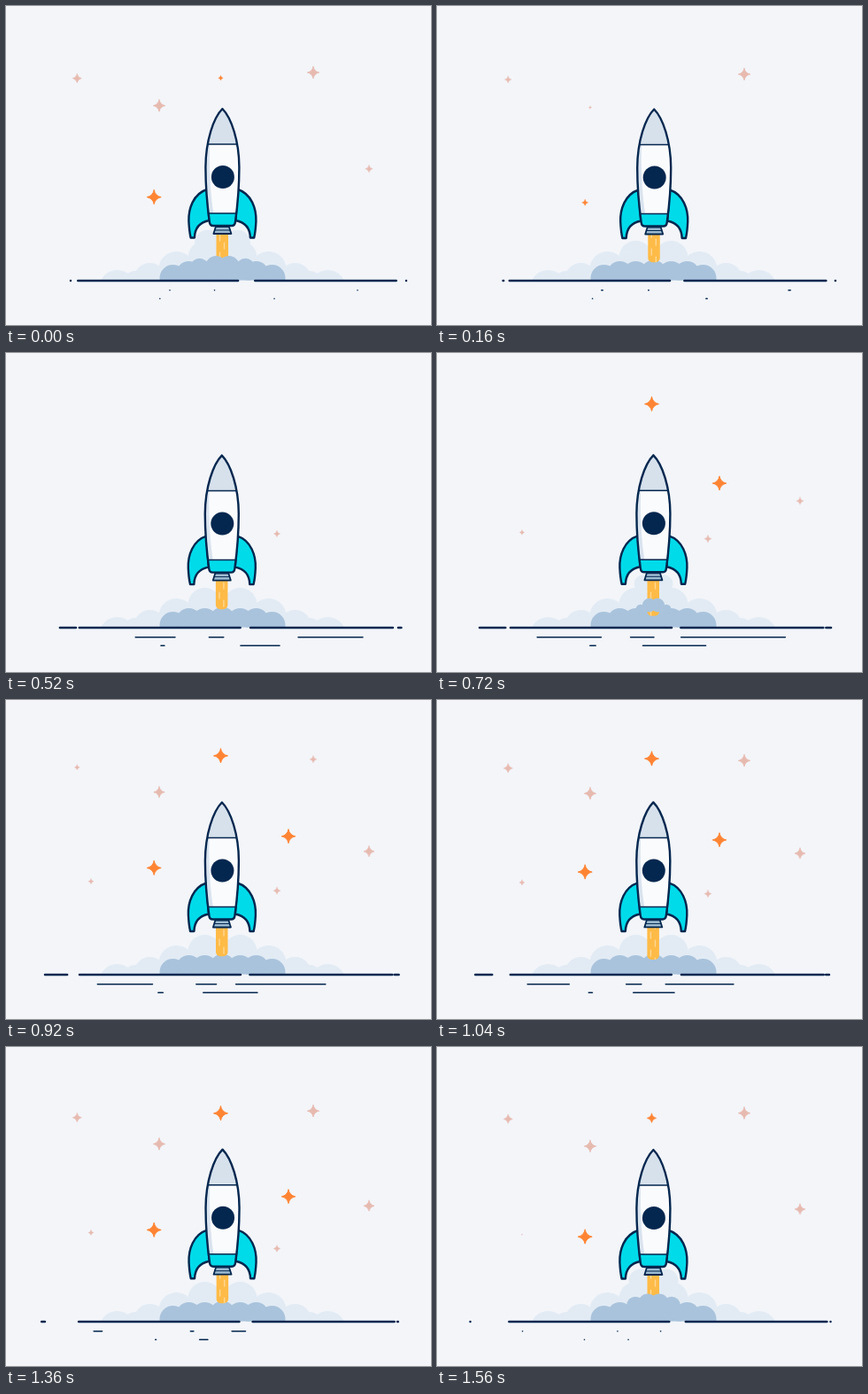
An HTML page with a canvas that plays this animation: 480x360 px, repeating every 1.6 s.

```html
<!DOCTYPE html>
<html lang="en">
<head>
<meta charset="utf-8">
<title>Rocket</title>
<style>
html, body { margin: 0; width: 100%; height: 100%; overflow: hidden; background: #f3f5f9; }
canvas { display: block; width: 480px; height: 360px; }
</style>
</head>
<body>
<canvas id="stage"></canvas>
<script>
const LOOP = 1600, PUFF = 400, MID = 244.5, GROUND = 309.5;
const NAVY = '#04274f', CYAN = '#00dbea', PALE = '#e2ebf4', SMOKE = '#a9c3dc';
const ORANGE = '#ff8433', PINK = '#e7bab0';

const canvas = document.getElementById('stage');
const dpr = window.devicePixelRatio || 1;
canvas.width = 480 * dpr;
canvas.height = 360 * dpr;
const ctx = canvas.getContext('2d');

// x, first y, px per second, radius, birth, life, colour
const stars = [
  [80.3, 75.4, 8.3, 5, 850, 1010, PINK],
  [173, 102.6, 12.5, 6.7, 810, 987, PINK],
  [242.5, 54.3, 27, 8, 600, 1045, ORANGE],
  [347, 66.1, 12, 6.7, 850, 1050, PINK],
  [410, 165.5, 19, 6, 640, 1050, PINK],
  [167.2, 183.3, 38.5, 8, 760, 1057, ORANGE],
  [319, 142.6, 34, 7.8, 590, 950, ORANGE],
  [306, 201.1, 28, 4, 415, 1065, PINK],
  [96, 201.3, 11, 3, 610, 990, PINK]
];

// y, start x, end x, drift, width
const dashes = [
  [310, 73, 37, 7, 2.5],
  [310, 452, 445, -6.5, 2.5],
  [320.8, 185, 96, 7, 1.6],
  [320.8, 235.5, 203, 12, 1.6],
  [320.8, 397, 252, 7, 1.6],
  [330.3, 173.8, 166, 6, 1.6],
  [330.3, 303, 215.5, 7, 1.6]
];

// Half clouds, mirrored: offset, y, radius
const paleCloud = [[119, 318, 20], [98, 314, 15], [82, 308, 18], [52, 297, 20], [20, 284, 19]];
const smokeCloud = [[56, 307, 15], [38, 302, 14], [20, 302, 14], [0, 302, 15]];

// time, dx, dy
const shake = [
  [0, 0, 0], [160, 0.8, 0.5], [520, -0.6, -0.4], [720, 0, -0.7],
  [920, -0.5, -0.5], [1160, 0.3, -0.6], [1560, 0, 0], [1600, 0, 0]
];

const clamp = x => Math.max(0, Math.min(1, x));
const inOut = x => x < 0.5 ? 4 * x ** 3 : 1 - 4 * (1 - x) ** 3;

function shakeAt(t) {
  const i = shake.findIndex(s => s[0] > t);
  const a = shake[i - 1], b = shake[i];
  const k = (t - a[0]) / (b[0] - a[0]);
  return [a[1] + (b[1] - a[1]) * k, a[2] + (b[2] - a[2]) * k];
}

function shape(d, fill, width) {
  const path = new Path2D(d);
  if (fill) {
    ctx.fillStyle = fill;
    ctx.fill(path);
  }
  if (width) {
    ctx.lineWidth = width;
    ctx.strokeStyle = NAVY;
    ctx.stroke(path);
  }
}

function line(x1, x2, y, width) {
  const cap = width / 2;
  const a = Math.min(x1, x2) + cap, b = Math.max(a + 0.01, Math.max(x1, x2) - cap);
  ctx.lineWidth = width;
  ctx.strokeStyle = NAVY;
  ctx.beginPath();
  ctx.moveTo(a, y);
  ctx.lineTo(b, y);
  ctx.stroke();
}

function pair(dx, y, r, color) {
  ctx.fillStyle = color;
  for (const side of [-1, 1]) {
    ctx.beginPath();
    ctx.arc(MID + side * dx, y, r, 0, 7);
    ctx.fill();
  }
}

function drawStar([x, y, speed, size, birth, life, color], t) {
  const age = (t - birth + LOOP) % LOOP;
  if (age >= life) return;
  const r = size * Math.min(clamp(age / 120), clamp((life - age) / 130));
  const k = r * 0.17;
  ctx.save();
  ctx.translate(x, y + speed * age / 1000);
  ctx.beginPath();
  ctx.moveTo(0, -r);
  ctx.quadraticCurveTo(k, -k, r, 0);
  ctx.quadraticCurveTo(k, k, 0, r);
  ctx.quadraticCurveTo(-k, k, -r, 0);
  ctx.quadraticCurveTo(-k, -k, 0, -r);
  ctx.fillStyle = ctx.strokeStyle = color;
  ctx.lineWidth = r * 0.12;
  ctx.fill();
  ctx.stroke();
  ctx.restore();
}

function drawFlame(t, dx) {
  const end = 293 + 4 * Math.cos((t - 340) / PUFF * 2 * Math.PI);
  ctx.save();
  ctx.beginPath();
  ctx.roundRect(237.5 + dx, 254, 13.5, end - 254, [0, 0, 5, 5]);
  ctx.fillStyle = '#ffbb47';
  ctx.fill();
  ctx.clip();
  ctx.strokeStyle = '#ffd794';
  ctx.lineWidth = 1.4;
  ctx.setLineDash([7, 13]);
  [241.5, 246.5].forEach((x, i) => {
    ctx.lineDashOffset = -t / PUFF * 40 - i * 9;
    ctx.beginPath();
    ctx.moveTo(x + dx, 258);
    ctx.lineTo(x + dx, 300);
    ctx.stroke();
  });
  ctx.restore();
}

function drawSmoke(t, dx) {
  const u = (t + 120) % PUFF;
  const grow = tau => 1 - Math.exp(-u / tau);
  ctx.save();
  ctx.beginPath();
  ctx.rect(0, 0, 480, GROUND);
  ctx.clip();

  for (const c of paleCloud) pair(...c, PALE);
  ctx.fillRect(MID - 60, 284, 120, 26);
  const sink = 0.0004 * Math.max(0, u - 100) ** 2;
  pair(9.5 + 0.06 * u, 257 + 0.085 * u + sink, 15.5 * grow(40), PALE);

  for (const c of smokeCloud) pair(...c, SMOKE);
  drawFlame(t, dx);
  const r = 13 * grow(45);
  pair(0.6 * r, 279.7 + 0.12 * u, r, SMOKE);
  pair(9 + 0.14 * u, 286 + 0.07 * u + sink, Math.min(10, u / 8), SMOKE);
  ctx.restore();
}

function drawRocket(dx, dy) {
  const body = 'M0 116C-10 126-18.9 152-19 182C-19 204-17 226-14.5 244Q-14 248-10.5 248' +
    'H10.5Q14 248 14.5 244C17 226 19 204 19 182C18.9 152 10 126 0 116Z';
  const fin = 'M-17.5 207C-33 212-38.5 229-38 243Q-37.5 254-35.8 261.5H-31.5Q-31 245-15 242Z';
  ctx.save();
  ctx.translate(244.4 + dx, dy);
  shape(fin, CYAN, 2.4);
  ctx.save();
  ctx.scale(-1, 1);
  shape(fin, CYAN, 2.4);
  ctx.restore();
  shape('M-7.5 249H7.5L10 257H-10Z', '#9dbbd1', 1.8);
  shape('M-8.5 253H8.5', null, 1);

  ctx.save();
  ctx.clip(new Path2D(body));
  shape('M-20 110H20V250H-20Z', '#fafbfd');
  shape('M-20 150H-14Q-16 195-10 235H-20Z', '#dae4ef');
  shape('M-20 110H20V156H-20Z', '#d6e1ec');
  shape('M-20 234H20V250H-20Z', CYAN);
  shape('M-20 156H20M-20 234H20', null, 1.5);
  ctx.restore();
  shape(body, null, 2.4);

  ctx.fillStyle = NAVY;
  ctx.beginPath();
  ctx.arc(0.5, 193, 13, 0, 7);
  ctx.fill();
  ctx.restore();
}

function drawGround(t) {
  const sway = Math.sin(Math.PI * t / LOOP);
  const head = inOut(clamp(t / 1040));
  const tail = Math.sin(clamp((t - 540) / 1040) * Math.PI / 2) ** 2;
  line(80 + 1.8 * sway, 263.3 + 3 * sway, 310, 2.5);
  line(280 - 6 * sway, 442 - 4.5 * sway, 310, 2.5);
  for (const [y, from, to, drift, width] of dashes) {
    const x = from + drift * sway, span = to - from, cap = width / 2;
    line(x + span * head - cap, x + span * tail + cap, y, width);
  }
}

function draw(t) {
  ctx.setTransform(dpr, 0, 0, dpr, 0, 0);
  ctx.lineCap = ctx.lineJoin = 'round';
  ctx.fillStyle = '#f3f5f9';
  ctx.fillRect(0, 0, 480, 360);
  const [dx, dy] = shakeAt(t);
  for (const s of stars) drawStar(s, t);
  drawSmoke(t, dx);
  drawRocket(dx, dy);
  drawGround(t);
}

const start = performance.now();
function tick() {
  draw((performance.now() - start) % LOOP);
  requestAnimationFrame(tick);
}
tick();
</script>
</body>
</html>
```
